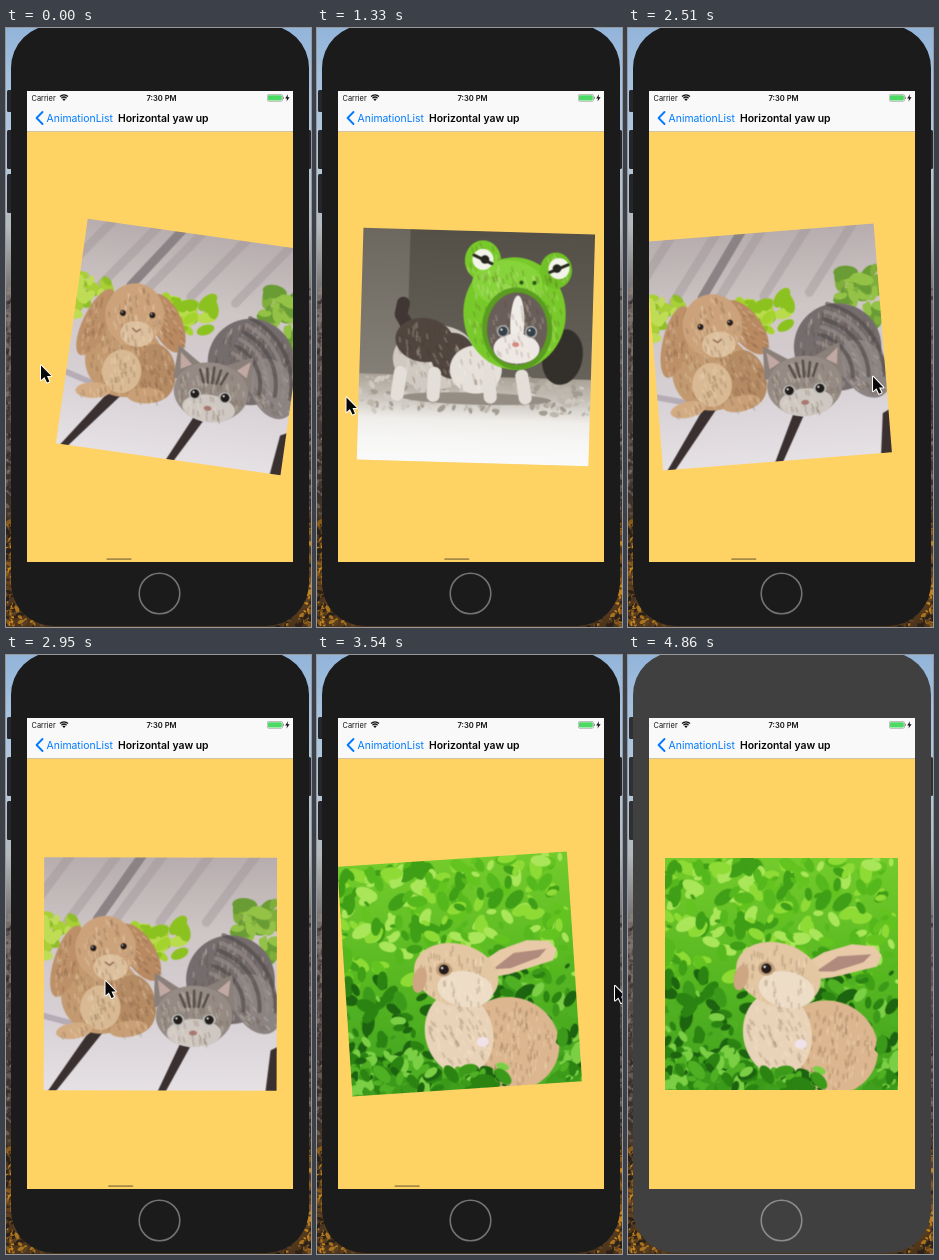
These frames come from a looping animation (305x599 px, 4.96 s). An HTML page with a canvas:

```html
<!DOCTYPE html>
<html lang="en">
<head>
<meta charset="utf-8">
<title>Horizontal yaw up</title>
<style>
html, body { margin: 0; width: 100%; height: 100%; overflow: hidden; background: #1b1b1b; }
canvas { display: block; width: 305px; height: 599px; }
</style>
</head>
<body>
<canvas id="stage"></canvas>
<script>
const W = 305, H = 599, LOOP = 4960, STEP = 147.5, LAST_STEP = 28, FLASH = 4860;
const SCREEN = { x: 21, y: 63, w: 266, h: 471 };
const SIZE = 233, PITCH = 345, CX = 154, CY = 319;

// Each swipe turns one page along a logistic curve
const SWIPES = [
  { mid: -251, tau: 97, by: 1 },
  { mid: 916, tau: 97, by: 1 },
  { mid: 2198, tau: 97, by: -1 },
  { mid: 3337, tau: 60, by: -1 },
];

const POINTER = [
  { t: 0, x: 35, y: 337.5 },
  { t: 500, x: 158, y: 358 },
  { t: 737, x: 114.5, y: 360 },
  { t: 1327, x: 29.5, y: 369.5 },
  { t: 2065, x: 201.5, y: 362 },
  { t: 2360, x: 272, y: 353 },
  { t: 2950, x: 99.5, y: 326 },
  { t: 3540, x: 298, y: 331 },
  { t: 3690, x: 304, y: 333 },
];

const canvas = document.getElementById('stage');
const stage = canvas.getContext('2d');
const dpr = window.devicePixelRatio || 1;
canvas.width = W * dpr;
canvas.height = H * dpr;
let ctx = stage;

function random(seed) {
  return () => (seed = (seed * 16807) % 2147483647) / 2147483647;
}
const rnd = random(4711);
const pick = list => list[Math.floor(rnd() * list.length)];

function rect(x, y, w, h, fill, r = 0) {
  ctx.fillStyle = fill;
  ctx.beginPath();
  ctx.roundRect(x, y, w, h, r);
  ctx.fill();
}

function oval(x, y, rx, ry, fill, deg = 0) {
  ctx.fillStyle = fill;
  ctx.beginPath();
  ctx.ellipse(x, y, rx, ry, deg * Math.PI / 180, 0, Math.PI * 2);
  ctx.fill();
}

function trace(pts) {
  ctx.beginPath();
  for (let i = 0; i < pts.length; i += 2) ctx.lineTo(pts[i], pts[i + 1]);
}

function poly(fill, ...pts) {
  trace(pts);
  ctx.fillStyle = fill;
  ctx.fill();
}

function line(color, width, ...pts) {
  trace(pts);
  ctx.strokeStyle = color;
  ctx.lineWidth = width;
  ctx.lineCap = ctx.lineJoin = 'round';
  ctx.stroke();
}

// Vertical gradient through evenly spaced colours
function fade(y0, y1, ...colors) {
  const g = ctx.createLinearGradient(0, y0, 0, y1);
  colors.forEach((c, i) => g.addColorStop(i / (colors.length - 1), c));
  return g;
}

function scatter(count, x, y, w, h, size, colors) {
  for (let i = 0; i < count; i++) {
    const r = size * (.3 + rnd());
    oval(x + rnd() * w, y + rnd() * h, r, r * .55, pick(colors), rnd() * 180);
  }
}

// Oval with a soft coat of light and dark strokes
function fur(x, y, rx, ry, fill, deg = 0) {
  ctx.save();
  ctx.translate(x, y);
  ctx.rotate(deg * Math.PI / 180);
  oval(0, 0, rx, ry, fill);
  for (let i = 0; i < rx * ry / 14; i++) {
    const a = rnd() * Math.PI * 2, r = Math.sqrt(rnd()) * .9;
    const px = Math.cos(a) * r * rx, py = Math.sin(a) * r * ry;
    line(pick(['#fff3dc30', '#4a302028']), 2, px, py, px + 1, py + 4);
  }
  ctx.restore();
}

function eye(x, y, r, color = '#241c1a') {
  oval(x, y, r, r, color);
  oval(x - r / 3, y - r / 3, r / 4, r / 4, '#dfe6e4');
}

function meadowPhoto() {
  const light = ['#8edb35', '#63c41f', '#a9e65a', '#3f9f16', '#55b81c'];
  const dark = ['#2b8412', '#4fb024', '#7bcf45', '#3c9a1a', '#1d6410'];
  rect(0, 0, SIZE, SIZE, fade(0, SIZE, '#74cc2c', '#58b822', '#3f9f1e'));
  scatter(260, 0, 0, SIZE, 125, 9, light);
  scatter(220, 0, 115, SIZE, 118, 9, dark);
  poly('#e8caa9', 136, 108, 158, 95, 186, 87, 208, 89, 215, 98, 211, 109, 166, 120, 146, 122);
  poly('#b08a7c', 150, 114, 172, 99, 205, 97, 197, 105, 168, 114);
  fur(162, 190, 50, 47, '#dcb68e', 18);
  fur(112, 176, 34, 42, '#e9d3b8', -10);
  fur(113, 117, 43, 31, '#e3c6a2', 18);
  fur(121, 132, 28, 18, '#eddcc6', 12);
  oval(76, 120, 7, 13, '#cfa684', 15);
  oval(101, 111, 8, 7, '#c09d78');
  eye(101, 111, 5);
  oval(135, 186, 6, 5, '#efe2e8');
  scatter(60, 0, 190, 75, 43, 9, dark);
  scatter(40, 70, 212, 90, 20, 8, dark);
  scatter(24, 211, 180, 22, 53, 9, dark);
}

function deckPhoto() {
  rect(0, 0, SIZE, SIZE, fade(0, SIZE, '#b7adae', '#cfc6c6', '#d6d0d4', '#e6e1e5'));
  // blurred planks behind
  for (let x = 10; x < 240; x += 46) line('#9a909360', 9, x + 20, -5, x - 32, 65);
  line('#8b8285', 9, 101, -5, 54, 62);
  scatter(28, 0, 58, 30, 42, 9, ['#a8cf35', '#8fbe2a', '#bfdc55']);
  scatter(45, 88, 68, 56, 32, 9, ['#a5d32e', '#8cc220', '#b9dc4c']);
  scatter(50, 192, 45, 41, 52, 10, ['#7fae3c', '#93c246', '#6a9c35']);
  // gaps between boards
  line('#b5acb5', 6, 0, 158, 45, 170);
  poly('#3a3030', 52, 165, 64, 169, 13, 233, 5, 233);
  poly('#3a3030', 136, 186, 146, 189, 122, 233, 114, 233);
  poly('#3a3030', 226, 192, 234, 188, 234, 233, 221, 233);
  // rabbit
  fur(58, 138, 40, 38, '#c39a70');
  fur(92, 146, 20, 29, '#b58b64', -12);
  fur(57, 150, 20, 22, '#d8b993');
  fur(31, 173, 18, 8, '#d2ab82', -8);
  fur(85, 171, 19, 8, '#c89f76', -8);
  fur(24, 104, 13, 37, '#bd9068', 18);
  fur(96, 95, 15, 32, '#b98a62', -32);
  fur(62, 91, 30, 32, '#cba27a');
  fur(67, 110, 17, 13, '#dcbf9c');
  eye(50, 91, 3);
  eye(80, 89, 3);
  line('#94705a', 1.5, 62, 105, 66, 108, 70, 105);
  // kitten
  fur(186, 122, 44, 44, '#756d6d', 20);
  fur(212, 146, 22, 32, '#8c8482', -30);
  for (let i = 0; i < 6; i++) {
    ctx.beginPath();
    ctx.arc(155, 150, 36 + i * 8, -1.25, .05);
    ctx.lineWidth = 4;
    ctx.strokeStyle = i % 2 ? '#4f4848a0' : '#968d8ba0';
    ctx.stroke();
  }
  poly('#8a7f79', 110, 149, 111, 115, 136, 131, 158, 131, 188, 117, 190, 152);
  for (const side of [-1, 1]) {
    poly('#c2a8a3', 150 + side * 34, 139, 150 + side * 36, 122, 150 + side * 23, 133);
  }
  fur(150, 158, 38, 30, '#958b84');
  fur(150, 175, 27, 14, '#cfc8c2');
  for (let i = -2; i <= 2; i++) line('#5a504b', 2.5, 150 + i * 7, 133 + Math.abs(i) * 2, 150 + i * 4.5, 149);
  for (const x of [134, 165]) {
    oval(x, 162, 6.5, 5.5, '#b9bcb8');
    eye(x, 162, 4.5);
  }
  oval(149, 175, 4, 2.5, '#a97970');
}

function hatPhoto() {
  rect(0, 0, SIZE, SIZE, fade(0, 150, '#545047', '#68635a'));
  rect(0, 0, 48, 150, fade(0, 150, '#6c685f', '#858077'));
  rect(0, 146, SIZE, 87, fade(146, SIZE, '#aaa398', '#c7c2ba', '#f0eeeb', '#f7f7f6', '#f9faf9'));
  scatter(200, 0, 148, SIZE, 34, 4, ['#bdb7ac', '#a29c92', '#cfcac2']);
  oval(203, 124, 20, 28, '#332f2b', 10);
  oval(118, 168, 75, 6, '#948d84');
  // kitten
  line('#403734', 13, 43, 75, 41, 86, 50, 101);
  fur(76, 128, 42, 32, '#cfc9c2', -5);
  fur(65, 111, 29, 22, '#51463f', 5);
  fur(94, 126, 22, 23, '#51463f', -15);
  fur(117, 139, 26, 24, '#e5e0da');
  for (const x of [42, 76, 130, 163]) line('#e3ded8', 13, x, 144, x + (x - 90) / 18, 166);
  // hood
  fur(154, 82, 51, 56, '#78ca2b', -5);
  fur(121, 30, 18, 20, '#78ca2b');
  fur(194, 38, 16, 18, '#70c126');
  fur(146, 52, 35, 23, '#86d33a');
  oval(157, 97, 35, 41, '#5a9d20', -5);
  for (const [x, y, side] of [[121, 29, 1], [197, 36, -1]]) {
    oval(x, y, 10.5, 10.5, '#f3f4e9');
    oval(x + 2 * side, y, 4.3, 4.3, '#22231c');
    line('#27291d', 3, x - 9, y - 4 * side, x + 9, y + 4 * side);
  }
  for (const x of [160, 173]) oval(x, 51, 2, 2, '#2d5515');
  // face
  fur(157, 97, 30, 36, '#695e59');
  fur(157, 92, 7, 28, '#efebe7');
  fur(157, 117, 23, 15, '#eee8e4');
  for (const x of [143, 171]) {
    oval(x, 100, 6, 6, '#bbb6b2');
    eye(x, 100, 4.7, '#35414a');
  }
  oval(156, 113, 3.5, 2.5, '#d48983');
}

function wallpaper() {
  rect(0, 0, W, H, fade(0, H, '#93b5da', '#a9c4e0', '#b5c8da', '#b3b9bd', '#77706f', '#5a4f4d',
    '#463c39', '#3a302b', '#6e4a20', '#4c341c'));
  for (const x of [0, 298]) {
    scatter(150, x, 260, 7, 240, 3, ['#6b605c80', '#2c262480', '#8d858080']);
    scatter(120, x, 490, 7, 109, 3, ['#c5841c', '#8a5a1c', '#2b2119', '#4a3622']);
  }
  for (const x of [0, W - 40]) scatter(60, x, 570, 40, 29, 3, ['#a87420', '#5a4020', '#2b2119']);
}

// Paints a still once so that each frame only copies it
function still(w, h, paint, blur) {
  const c = document.createElement('canvas');
  c.width = w * 2;
  c.height = h * 2;
  ctx = c.getContext('2d');
  ctx.scale(2, 2);
  ctx.filter = `blur(${blur}px)`;
  paint();
  ctx = stage;
  return c;
}

const backdrop = still(W, H, wallpaper, 0);
const photos = [meadowPhoto, deckPhoto, hatPhoto].map(paint => still(SIZE, SIZE, paint, 1.2));

function drawCard(page, pos) {
  const shift = (page - pos) * PITCH;
  if (Math.abs(shift) > 300) return;
  const scale = 1 - .0011 * Math.abs(shift);
  ctx.save();
  ctx.translate(CX + shift, CY);
  ctx.rotate(shift * .335 * Math.PI / 180);
  ctx.scale(scale, scale);
  ctx.drawImage(photos[page], 2, 2, SIZE * 2 - 4, SIZE * 2 - 4, -SIZE / 2, -SIZE / 2, SIZE, SIZE);
  ctx.restore();
}

function text(str, x, y, size, weight, color, align = 'left') {
  ctx.font = `${weight} ${size}px Inter, Roboto, sans-serif`;
  ctx.textAlign = align;
  ctx.fillStyle = color;
  ctx.fillText(str, x, y);
}

function drawPhone(flash) {
  ctx.drawImage(backdrop, 0, 0, W, H);
  const button = flash ? '#2f3033' : '#24262b';
  for (const [y, h] of [[62, 22], [102, 39], [146, 39]]) rect(1, y, 6, h, button, 1.5);
  rect(300, 102, 5, 39, button, 1.5);
  rect(5, -3, 298, 601, flash ? '#404040' : '#1b1b1b', 43);
  ctx.strokeStyle = flash ? '#8b8b8b' : '#737373';
  ctx.lineWidth = 1.6;
  ctx.beginPath();
  ctx.arc(153.5, 565.5, 20.3, 0, Math.PI * 2);
  ctx.stroke();
}

function drawBars() {
  const { x, y, w } = SCREEN;
  rect(x, y, w, 40, '#f9f9f9');
  rect(x, y + 40, w, 1, '#d2c5a3');
  text('Carrier', 25.5, 72.7, 7.4, 400, '#111');
  text('7:30 PM', 155.5, 72.7, 7.6, 600, '#111', 'center');
  ctx.strokeStyle = '#111';
  ctx.lineWidth = 1.3;
  ctx.lineCap = 'butt';
  for (const r of [3.8, 6]) {
    ctx.beginPath();
    ctx.arc(58, 73, r, -2.3, -.84);
    ctx.stroke();
  }
  poly('#111', 58, 73, 56.4, 71.2, 58, 70.4, 59.6, 71.2);
  rect(261, 66.3, 15.8, 7.2, '#8d918d', 1.7);
  rect(261.5, 66.8, 14.8, 6.2, '#f9f9f9', 1.3);
  rect(262, 67.3, 13.8, 5.2, '#4cd964', 1);
  rect(277.1, 68.8, .9, 2.3, '#8d918d');
  poly('#111', 282, 66.3, 279.2, 70.4, 281.1, 70.4, 280.5, 73.5, 283.6, 69.2, 281.6, 69.2);
  line('#007aff', 1.9, 36.5, 84, 30.6, 90, 36.5, 96);
  text('AnimationList', 40.6, 93.8, 10.4, 400, '#007aff');
  text('Horizontal yaw up', 112, 93.8, 10.4, 600, '#050505');
}

function drawPointer(t) {
  const i = POINTER.findIndex(p => p.t >= t);
  if (i < 0) return;
  const b = POINTER[i], a = POINTER[Math.max(0, i - 1)];
  const f = b === a ? 1 : (t - a.t) / (b.t - a.t);
  const e = f * f * (3 - 2 * f);
  ctx.save();
  ctx.translate(a.x + (b.x - a.x) * e, a.y + (b.y - a.y) * e);
  const arrow = [0, 0, 0, 14.5, 3.4, 11.5, 6, 17, 8.4, 15.9, 6, 10.6, 10.3, 10.6, 0, 0];
  line('#fff', 2, ...arrow);
  poly('#080808', ...arrow);
  ctx.restore();
}

function scrollAt(t) {
  return SWIPES.reduce((sum, s) => sum + s.by / (1 + Math.exp((s.mid - t) / s.tau)), 0);
}

function draw(time) {
  const step = Math.min(LAST_STEP, Math.floor((time + 8) / STEP));
  const t = step * STEP;
  const pos = scrollAt(t);
  const { x, y, w, h } = SCREEN;
  ctx.setTransform(dpr, 0, 0, dpr, 0, 0);
  drawPhone(time >= FLASH);
  ctx.save();
  ctx.beginPath();
  ctx.rect(x, y, w, h);
  ctx.clip();
  rect(x, y, w, h, '#ffd264');
  photos.forEach((_, page) => drawCard(page, pos));
  ctx.globalAlpha = Math.min(1, (LAST_STEP - step) / 3);
  rect(76.7 + 25.4 * pos, 530.2, 25.3, 1.8, '#a78a45', .9);
  ctx.globalAlpha = 1;
  drawBars();
  ctx.restore();
  drawPointer(t);
}

function tick(now) {
  draw(now % LOOP);
  requestAnimationFrame(tick);
}
draw(0);
requestAnimationFrame(tick);
</script>
</body>
</html>
```
